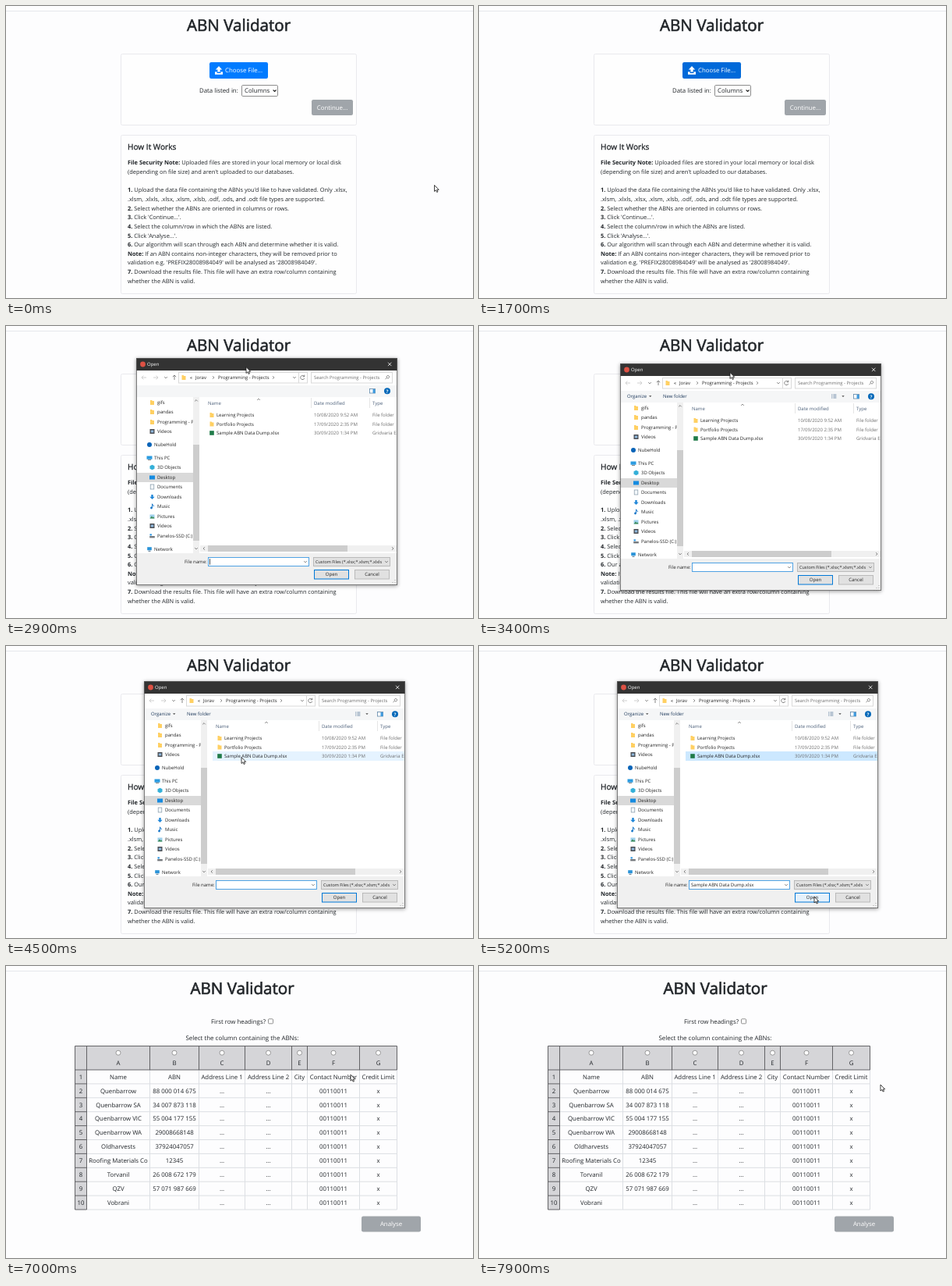
An HTML page for the animation above (8 s loop, 599 by 374 pixels).

```html
<!DOCTYPE html>
<html lang="en">
<head>
<meta charset="utf-8">
<title>ABN Validator</title>
<style>
  html, body { margin: 0; width: 100%; height: 100%; overflow: hidden; background: #fdfdfe; }
  svg { display: block; font-family: "Open Sans", "Noto Sans", sans-serif; fill: #212529; text-rendering: geometricPrecision; }
  .line { fill: none; stroke: #666; stroke-width: .8; }
  .card { fill: #fefefe; stroke: #e9e9ed; }
  .heading { font-weight: 500; stroke: #212529; stroke-width: .03em; }
  .dialog { filter: drop-shadow(0 1.5px 2.5px rgba(0, 0, 0, .4)); }
  .dialog text { fill: #222; }
  .dialog .light { fill: #fff; }
  .dialog .dim { fill: #6d6d6d; }
</style>
</head>
<body>
<svg id="stage" width="599" height="374" viewBox="0 0 599 374"></svg>
<script>
const LOOP = 8000, STEP = 100;
const BODY = 7.83, SMALL = 7.42, UI = 6;

const text = (x, y, s, size = BODY, attrs = '') =>
  `<text x="${x}" y="${y}" font-size="${size}" ${attrs}>${s}</text>`;
const centered = (x, y, s, size = BODY, attrs = '') =>
  text(x, y, s, size, `text-anchor="middle" ${attrs}`);
const rect = (x, y, w, h, fill, attrs = '') =>
  `<rect x="${x}" y="${y}" width="${w}" height="${h}" fill="${fill}" ${attrs}/>`;
const path = (d, attrs = 'class="line"') => `<path d="${d}" ${attrs}/>`;
const at = (x, y, body) => `<g transform="translate(${x} ${y})">${body}</g>`;
const chevron = (x, y, dir = 0) =>
  `<path class="line" d="M-1.8 -.9L0 .9L1.8 -.9" transform="translate(${x} ${y}) rotate(${dir})"/>`;

// Upload form
const steps = [
  ['File Security Note:', 'Uploaded files are stored in your local memory or local disk'],
  ['', '(depending on file size) and aren\'t uploaded to our databases.'],
  null,
  ['1.', 'Upload the data file containing the ABNs you\'d like to have validated. Only .xlsx,'],
  ['', '.xlsm, .xlxls, .xlsx, .xlsm, .xlsb, .odf, .ods, and .odt file types are supported.'],
  ['2.', 'Select whether the ABNs are oriented in columns or rows.'],
  ['3.', 'Click \'Continue...\'.'],
  ['4.', 'Select the column/row in which the ABNs are listed.'],
  ['5.', 'Click \'Analyse...\'.'],
  ['6.', 'Our algorithm will scan through each ABN and determine whether it is valid.'],
  ['Note:', 'If an ABN contains non-integer characters, they will be removed prior to'],
  ['', 'validation e.g. \'PREFIX28008984049\' will be analysed as \'28008984049\'.'],
  ['7.', 'Download the results file. This file will have an extra row/column containing'],
  ['', 'whether the ABN is valid.']
];
const howItWorks = steps.map((line, i) => line ? text(156, 203.3 + 11.65 * i,
  (line[0] ? `<tspan font-weight="700">${line[0]}</tspan> ` : '') + line[1], SMALL) : '').join('');

const form = `<g id="form">
  ${rect(147.5, 61.5, 302, 91, '', 'id="upload" class="card" rx="2"')}
  ${rect(261, 72, 75, 21, '#007bff', 'id="choose" rx="2.2"')}
  ${path('M273 77l4.2 4.4h-2.6v3.2h-3.2v-3.2h-2.6zM268 84.2h2.6v1.7h4.8v-1.7h2.6v3.6h-10z', 'fill="#fff"')}
  ${text(281, 85.4, 'Choose File...', BODY, 'fill="#fff"')}
  ${centered(298.5, 106.7, 'Chosen File: Sample ABN Data Dump.xlsx', BODY, 'id="chosen"')}
  <g id="lower">
    ${text(248, 111, 'Data listed in:')}
    ${rect(302.5, 101.5, 46, 14, '#fff', 'stroke="#8c8c8c" rx="1.3"')}
    ${text(306, 111.3, 'Columns')}
    ${path('M342.6 107.5l2 2l2 -2', 'fill="none" stroke="#222" stroke-width="1.1"')}
    ${rect(392, 120, 53, 20, '#a0a5aa', 'id="continue" rx="2.2" stroke="#6c757d" stroke-opacity=".5" stroke-width="0" paint-order="stroke"')}
    ${centered(418.5, 132.8, 'Continue...', BODY, 'fill="#fff"')}
    ${rect(147.5, 165.5, 302, 203, '', 'class="card" rx="2"')}
    ${text(156, 184.3, 'How It Works', 10.1, 'class="heading"')}
    ${howItWorks}
  </g>
</g>`;

// Column picker
const edges = [88.5, 103.5, 184.5, 247.5, 306.5, 366.5, 386.5, 453.5, 501.5];
const rowTop = 133, rowHeight = 17.9, bottom = 312;
const middle = i => (edges[i] + edges[i + 1]) / 2;
const entries = [
  ['Quenbarrow', '88 000 014 675'], ['Quenbarrow SA', '34 007 873 118'],
  ['Quenbarrow VIC', '55 004 177 155'], ['Quenbarrow WA', '29008668148'],
  ['Oldharvests', '37924047057'], ['Roofing Materials Co', '12345'],
  ['Torvanil', '26 008 672 179'], ['QZV', '57 071 987 669'], ['Vobrani', '']
];
const rows = [
  ['Name', 'ABN', 'Address Line 1', 'Address Line 2', 'City', 'Contact Number', 'Credit Limit'],
  ...entries.map(([name, abn]) => [name, abn, '...', '...', '', '00110011', 'x'])
];
const rules = rows.map((_, r) => rowTop + rowHeight * (r + 1));
const table = `<g id="table">
  ${text(263, 74, 'First row headings?')}
  ${rect(336.5, 67.8, 6, 6, '#fff', 'stroke="#767676" stroke-width=".8" rx="1"')}
  ${centered(303, 95, 'Select the column containing the ABNs:', 7.95)}
  ${rect(88.5, 102.5, 413, 30.5, '#d5d5d8')}
  ${rect(88.5, 133, 15, 179, '#d5d5d8')}
  ${path(edges.slice(2).map(x => `M${x} 133V${bottom}`).join('') +
    rules.map(y => `M104 ${y}H501.5`).join(''), 'stroke="#dcdfe3" fill="none"')}
  ${path(edges.map(x => `M${x} 102.5V133`).join('') + 'M88.5 102.5H501.5M88.5 133H501.5M88.5 133V312M103.5 133V312' +
    rules.map(y => `M88.5 ${y}H103.5`).join(''), 'stroke="#56565a" fill="none" stroke-width=".9"')}
  ${[...'ABCDEFG'].map((letter, i) =>
    `<circle cx="${middle(i + 1)}" cy="111.2" r="3" fill="#fff" stroke="#767676" stroke-width=".7"/>` +
    centered(middle(i + 1), 127.2, letter)).join('')}
  ${rows.map((cells, r) => {
    const y = rowTop + rowHeight * (r + .5) + 2.8;
    return centered(middle(0), y, r + 1) + cells.map((s, i) => centered(middle(i + 1), y, s)).join('');
  }).join('')}
  ${rect(456, 320.5, 76, 20, '#a0a5aa', 'rx="2.2"')}
  ${centered(494, 333.4, 'Analyse', BODY, 'fill="#fff"')}
</g>`;

// File dialog, drawn from its own top left corner
const icons = {
  folder: path('M-2.5 -3h2l1 1h2v5h-5z', 'fill="#ffd062"'),
  film: rect(-3, -3, 6, 6, '#4a4d52') + rect(-1.7, -1.5, 3.4, 3, '#8fb8dc'),
  dot: '<circle r="3" fill="#0a64b8"/>',
  pc: rect(-3.5, -2.5, 7, 4.2, '#2b9be0') + rect(-2, 2.2, 4, .8, '#666'),
  cube: path('M0 -3.2l3 1.5v3.4l-3 1.5l-3 -1.5v-3.4z', 'fill="#35b0d8"'),
  screen: rect(-3.5, -2.5, 7, 5, '#168be0'),
  page: rect(-2.3, -3, 4.6, 6, '#f4f8fb', 'stroke="#8296a5" stroke-width=".7"'),
  down: path('M-1.2 -3h2.4v2.8h2l-3.2 3.3l-3.2 -3.3h2z', 'fill="#1f86d8"'),
  note: path('M0 -3.2c.5 1.6 2 1.5 2 3.2M0 -3.2v5', 'fill="none" stroke="#1b78c9"') + '<circle cx="-1" cy="2" r="1.4" fill="#1b78c9"/>',
  picture: rect(-3, -2.5, 6, 5, '#9ed0ec') + path('M-3 2.5l2.4 -3l1.6 1.8l1 -1l1 2.2z', 'fill="#3c8b57"'),
  drive: rect(-3.3, 0, 6.6, 2.4, '#75797d') + rect(-3, -2.6, 2.4, 2, '#1f8fdf'),
  net: rect(-2.8, -2.8, 5.6, 4, '#2a93d8') + rect(-1.5, 1.8, 3, 1, '#4c6c86'),
  sheet: rect(-2.8, -2.8, 5.6, 5.6, '#1f7a48')
};
const tree = [
  [57, 'gifs', 'folder'], [69, 'pandas', 'folder'], [82, 'Programming - Projects', 'folder'], [94, 'Videos', 'film'],
  [111, 'NubeHold', 'dot', 1], [128, 'This PC', 'pc', 1], [140, '3D Objects', 'cube'], [153, 'Desktop', 'screen'],
  [165, 'Documents', 'page'], [178, 'Downloads', 'down'], [190, 'Music', 'note'], [203, 'Pictures', 'picture'],
  [215, 'Videos', 'film'], [228, 'Panelos-SSD (C:)', 'drive'], [245, 'Network', 'net', 1]
];
const files = [
  ['Learning Projects', '10/08/2020 9:52 AM', 'File folder', 'folder'],
  ['Portfolio Projects', '17/09/2020 2:35 PM', 'File folder', 'folder'],
  ['Sample ABN Data Dump.xlsx', '30/09/2020 1:34 PM', 'Gridvaria Excerpt', 'sheet']
];
const fileY = i => 73 + 11.5 * i;

const dialog = `<g id="dialog" class="dialog">
  ${rect(0, 0, 335, 291, '#fff')}
  ${rect(0, 0, 335, 16, '#333')}
  <circle cx="8.5" cy="8" r="3.4" fill="#dd5144"/>
  ${text(14, 10.3, 'Open', UI, 'class="light"')}
  ${path('M323 5.7l4.4 4.4M327.4 5.7l-4.4 4.4', 'stroke="#fff" stroke-width=".8"')}
  ${path('M13 25h-6m2.4 -2.4l-2.4 2.4l2.4 2.4M22 25h6m-2.4 -2.4l2.4 2.4l-2.4 2.4', 'fill="none" stroke="#c4c4c4" stroke-width=".8"')}
  ${chevron(38, 25)}
  ${path('M49 28v-6m-2.2 2.2l2.2 -2.2l2.2 2.2')}
  ${rect(54.5, 18.5, 165, 13.5, '#fff', 'stroke="#d9d9d9"')}
  ${at(61, 25, icons.folder)}
  ${text(69, 27, '«', UI)}${text(76, 27.2, 'Jorav', UI)}
  ${chevron(99, 25, -90)}${text(105, 27.2, 'Programming - Projects', UI)}${chevron(176, 25, -90)}
  ${chevron(203, 25)}
  ${path('M208.5 19V32', 'stroke="#d9d9d9"')}
  ${path('M215.5 23.5a2.6 2.6 0 1 0 .3 2.4M215.8 21.6v2.2h-2.2')}
  ${rect(224.5, 18.5, 104, 13.5, '#fff', 'stroke="#d9d9d9"')}
  ${text(228, 27.2, 'Search Programming - Projects', 5.9, 'class="dim"')}
  ${path('M319.5 27.2l2 -2a1.7 1.7 0 1 1 .4 .4')}
  ${rect(0, 35, 335, 15, '#f5f6f7')}
  <g id="tools">
    ${text(9, 44.4, 'Organize', UI, 'style="fill:#1e395b"')}${path('M37 41.3h3.4l-1.7 1.8z', 'fill="#444"')}
    ${text(55, 44.4, 'New folder', UI, 'style="fill:#1e395b"')}
    ${path('M271 40h1.4m1 0h4M271 42h1.4m1 0h4M271 44h1.4m1 0h4', 'stroke="#6c8aa5" stroke-width=".9"')}
    ${path('M284.3 41.3h3.4l-1.7 1.8z', 'fill="#444"')}
  </g>
  ${rect(299.5, 39.5, 7, 5.5, '#fff', 'stroke="#5f87a8" stroke-width=".8"')}${rect(303.5, 40, 3, 5, '#3f9be0')}
  <circle cx="322" cy="42.3" r="4" fill="#0067b8"/>${centered(322, 44.6, '?', 6.2, 'class="light" font-weight="700"')}
  ${rect(0, 147, 73, 12, '#d9d9d9')}
  <svg width="73" height="291">${tree.map(([y, name, icon, root]) =>
    at(root ? 17 : 20.5, y, icons[icon]) + text(root ? 23 : 27, y + 2.2, name, UI)).join('')}</svg>
  ${rect(73, 50, 8, 200, '#f0f0f0')}${rect(73, 111, 8, 123, '#cdcdcd')}
  ${chevron(77, 54.5, 180)}${chevron(77, 244)}
  ${path('M224.5 51V64M299.5 51V64', 'stroke="#e5e5e5"')}
  ${chevron(157, 53, 180)}
  ${[[92, 'Name'], [228, 'Date modified'], [303, 'Type']].map(([x, s]) => text(x, 60.2, s, UI, 'style="fill:#4c607a"')).join('')}
  <svg id="list" width="334" height="291">
    ${rect(88, 0, 246, 12, '#e5f3ff', 'id="row"')}
    ${files.map(([name, date, type, icon], i) => at(97, fileY(i), icons[icon]) +
      text(103, fileY(i) + 2.2, name, UI) + text(228, fileY(i) + 2.2, date, UI, 'class="dim"') +
      text(303, fileY(i) + 2.2, type, UI, 'class="dim"')).join('')}
  </svg>
  ${rect(82, 240, 252, 8, '#f0f0f0')}${rect(92, 240, 179, 8, '#cdcdcd')}
  ${chevron(87, 244, 90)}${chevron(329, 244, -90)}
  ${rect(0, 250, 335, 41, '#f0f0f0')}
  ${at(0, -.5, `
    ${text(62, 263.2, 'File name:', UI)}
    ${rect(92.5, 256, 129, 11, '#fff', 'stroke="#3f9ae2" stroke-width=".9"')}
    ${text(95, 263.6, 'Sample ABN Data Dump.xlsx', UI, 'id="fileName"')}
    ${rect(94.2, 257.7, .8, 7.5, '#222', 'id="caret"')}
    ${chevron(217, 261.5)}
    ${rect(227.5, 256, 98, 11, '#e1e1e1', 'stroke="#b5b5b5" stroke-width=".9"')}
    ${text(230, 263.4, 'Custom Files (*.xlsx;*.xlsm;*.xlxls', 5.5)}${chevron(321, 261.5)}
    ${rect(228.5, 272, 44, 11.5, '#e1e1e1', 'id="open" stroke="#0078d7"')}${centered(250.5, 279.8, 'Open', UI)}
    ${rect(280.5, 272, 44, 11.5, '#e1e1e1', 'stroke="#b5b5b5" stroke-width=".9"')}${centered(302.5, 279.8, 'Cancel', UI)}`)}
  ${path('M332 284v1M332 287v1M329 287v1M332 290v1M329 290v1M326 290v1', 'stroke="#a5a5a5"')}
  ${rect(.4, .4, 334.2, 290.2, 'none', 'stroke="#5a5a5a" stroke-width=".8"')}
</g>`;

const cursors =
  path('M0 0V8L1.9 6.3L3.2 9L4.5 8.4L3.3 5.8H5.7Z', 'id="arrow" fill="#fff" stroke="#111" stroke-width=".8"') +
  path('M-.8 .8c0 -1.1 1.6 -1.1 1.6 0V3.8l2.5 .6q1 .3 .8 1.4L3.4 9.3H-1.3L-3.6 5.8q0 -1.2 1.2 -.6L-.8 6.6z',
    'id="hand" fill="#fff" stroke="#111" stroke-width=".7"');

document.getElementById('stage').innerHTML =
  rect(0, 0, 599, 374, '#fdfdfe') + path('M0 6.5H599', 'stroke="#e6e8ec"') +
  centered(0, 0, 'ABN Validator', 20.6, 'id="title" class="heading"') + form + table + dialog + cursors;

const el = id => document.getElementById(id);
const show = (id, on) => el(id).setAttribute('visibility', on ? 'inherit' : 'hidden');
const move = (id, x, y) => el(id).setAttribute('transform', `translate(${x} ${y})`);
const paint = (id, fill) => el(id).setAttribute('fill', fill);

// Keys are [time, x, y]
const dialogKeys = [[1900, 7, -43], [2700, 7, -43], [2800, 75, -12], [2900, 167, 41], [3100, 192, 64],
  [3200, 190, 59], [3400, 181, 48], [3600, 177, 45]];
const pointerKeys = [[0, 549.5, 229.5], [200, 500, 190], [500, 380, 105], [700, 325, 64], [900, 322, 79],
  [1500, 321, 81], [1600, 244, 27], [3600, 318, 56.5], [4400, 303, 141], [4500, 302, 142.5], [4700, 302, 142.5],
  [5100, 430, 321], [5500, 430, 321], [6100, 436, 140], [6200, 437, 138.3], [6900, 437, 138.3],
  [7100, 447, 140], [7800, 509, 150], [7900, 515, 152]];

function follow(keys, t) {
  const next = keys.findIndex(key => key[0] > t);
  if (next < 0) return keys[keys.length - 1].slice(1);
  if (next === 0) return keys[0].slice(1);
  const [t0, x0, y0] = keys[next - 1], [t1, x1, y1] = keys[next];
  const k = (t - t0) / (t1 - t0);
  return [x0 + (x1 - x0) * k, y0 + (y1 - y0) * k];
}

function render(t) {
  const picking = t >= 7000, chosen = t >= 5500 && !picking;
  const dialogOpen = t >= 1900 && t < 5300, dragging = t >= 2700 && t < 3600;
  const [dx, dy] = follow(dialogKeys, t);
  const [px, py] = dragging ? [dx + 141, dy + 11.5] : follow(pointerKeys, t);

  move('title', picking ? 303 : 298.5, picking ? 35.5 : 31.8);
  show('form', !picking);
  show('table', picking);
  show('chosen', chosen);
  move('lower', 0, chosen ? 12.5 : 0);
  el('upload').setAttribute('height', chosen ? 103.5 : 91);
  paint('choose', t < 900 || chosen ? '#007bff' : t < 1000 ? '#0072ec' : '#0069d9');

  const onContinue = chosen && t >= 6100;
  paint('continue', onContinue ? '#565e64' : chosen ? '#6c757d' : '#a0a5aa');
  el('continue').setAttribute('stroke-width', t < 6400 ? 0 : t < 6500 ? 1.6 : 3.2);

  show('dialog', dialogOpen);
  move('dialog', dx, dy);
  el('dialog').setAttribute('opacity', t < 2000 ? .6 : 1);
  show('list', dialogOpen && t >= 2100);
  show('tools', dialogOpen && t >= 3000);

  const selected = t >= 4600;
  const hovered = selected ? 2 : Math.floor((py - dy - fileY(0) + 5.75) / 11.5);
  show('row', dialogOpen && t >= 3600 && hovered >= 0 && hovered < files.length);
  el('row').setAttribute('y', fileY(hovered) - 6);
  paint('row', selected ? '#cce8ff' : '#e5f3ff');
  show('fileName', dialogOpen && selected);
  show('caret', dialogOpen && !selected && t % 1000 >= 600);
  paint('open', t >= 5100 ? '#e5f1fb' : '#e1e1e1');

  const hand = t >= 900 && t < 1600 || onContinue;
  const pointerShown = t < 1700 || t >= 2800;
  show('hand', pointerShown && hand);
  show('arrow', pointerShown && !hand);
  move('hand', px, py);
  move('arrow', px, py);
}

const start = performance.now();
function tick() {
  const t = (performance.now() - start) % LOOP;
  render(Math.floor(t / STEP) * STEP);
  requestAnimationFrame(tick);
}
tick();
</script>
</body>
</html>
```
